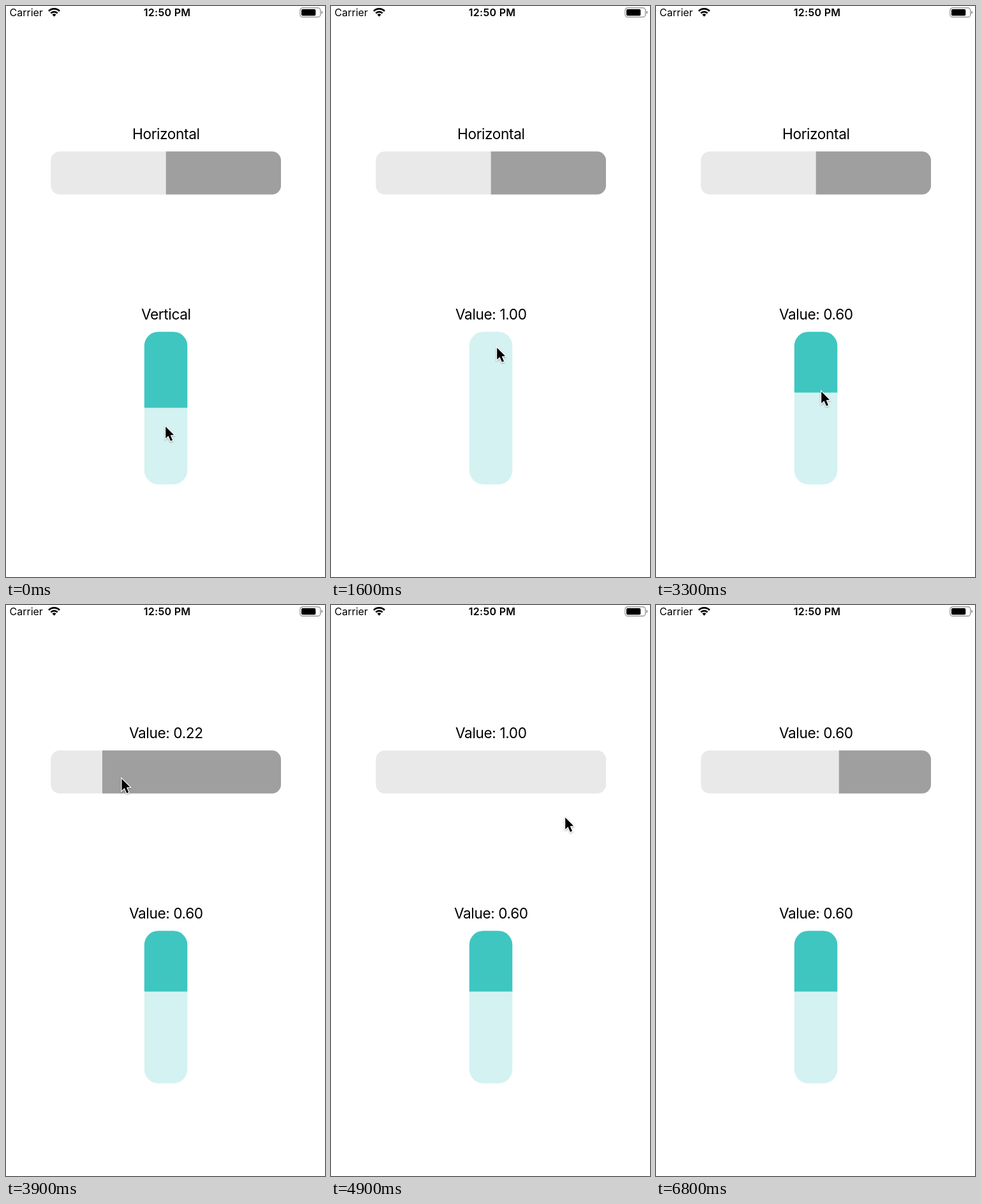
Write an HTML page that moves like this. It is 500 by 896 pixels and loops after 7500 ms.

```html
<!DOCTYPE html>
<html lang="en">
<head>
<meta charset="utf-8">
<title>Slider demo</title>
<style>
  html, body { margin: 0; width: 100%; height: 100%; overflow: hidden; background: #fff; }
  svg { display: block; width: 500px; height: 896px; font-family: Inter, sans-serif; }
  .label { font-size: 22.67px; letter-spacing: -.4px; text-anchor: middle; }
  .status { font-size: 16px; }
  .clock { font-weight: 600; letter-spacing: .3px; text-anchor: middle; }
</style>
</head>
<body>
<svg viewBox="0 0 500 896">
  <defs>
    <clipPath id="hClip"><rect x="70.3" y="228.3" width="360.7" height="67.5" rx="14"/></clipPath>
    <clipPath id="vClip"><rect x="216.8" y="511.2" width="67.5" height="239.5" rx="22"/></clipPath>
    <filter id="shadow" x="-50%" y="-50%" width="200%" height="200%">
      <feDropShadow dx="0" dy="1.2" stdDeviation="1.2" flood-opacity=".35"/>
    </filter>
  </defs>

  <text class="status" x="5.5" y="16">Carrier</text>
  <g fill="none" stroke="#000" stroke-width="2.7">
    <path d="M67 8A12 12 0 0 1 84 8M70.3 11.3A7.4 7.4 0 0 1 80.7 11.3"/>
    <path d="M75.5 16.7l-3-3.2a4.2 4.2 0 0 1 6 0z" fill="#000" stroke="none"/>
  </g>
  <text class="status clock" x="252.6" y="16">12:50 PM</text>
  <rect x="461" y="2.8" width="31.8" height="14.6" rx="4" fill="none" stroke="#8a8a8a" stroke-width="1.2"/>
  <rect x="463" y="5" width="22.3" height="10.3" rx="2"/>
  <path d="M494.3 7.6q2 .8 2 2.5t-2 2.5z" fill="#8a8a8a"/>

  <text class="label" id="hLabel" x="250.8" y="209"></text>
  <g clip-path="url(#hClip)">
    <rect id="hFill" x="70" y="228" height="69" fill="#e9e9e9"/>
    <rect id="hRest" y="228" height="69" fill="#9f9f9f"/>
  </g>

  <text class="label" id="vLabel" x="250.8" y="492"></text>
  <g clip-path="url(#vClip)">
    <rect id="vRest" x="216" y="511" width="70" fill="#3fc6c1"/>
    <rect id="vFill" x="216" width="70" fill="#d4f2f1"/>
  </g>

  <path id="cursor" d="M0 0V19L4.4 15 8 23.3 11.2 22 7.7 13.8 13.3 13.4z" stroke="#fff"
        stroke-width="2.4" paint-order="stroke" filter="url(#shadow)"/>
</svg>
<script>
const LOOP = 7500, STEP = 100, V_START = 200, H_START = 3700, EXIT = 6800;

// Turning points [ms, value]; slider values past 0 or 1 are held at the limit.
const vTurns = [[V_START, .5], [650, 1.2], [1050, .28], [1600, 1.3], [2300, -.2], [2850, 1.25], [3200, .6]];
const hTurns = [[H_START, .5], [4200, -.3], [4700, 1.2], [5700, 1.2], [6300, .6]];
const xTurns = [[V_START, 250], [1600, 260], [2500, 280], [3300, 259], [H_START, 282], [4160, 29],
  [4700, 515], [4800, 515], [4900, 367], [5200, 224], [5780, 312], [6300, 168], [6400, 168], [6700, 240]];
const yTurns = [[V_START, 659], [650, 500], [1050, 709], [1400, 485], [2180, 812], [2210, 812],
  [2815, 480], [3200, 604], [3300, 604], [H_START, 268], [4300, 283], [5100, 341], [5600, 280],
  [6100, 315], [6400, 290], [6700, 391]];

const el = id => document.getElementById(id);
const clamp = value => Math.min(1, Math.max(0, value));
const set = (id, attrs) => Object.entries(attrs).forEach(([name, value]) => el(id).setAttribute(name, value));

// Swing from one turning point to the next with cosine easing.
function swing(turns, t) {
  return turns.reduce((value, [end, target], i) => {
    if (i === 0) return target;
    const begin = turns[i - 1][0];
    const ease = (1 - Math.cos(Math.PI * clamp((t - begin) / (end - begin)))) / 2;
    return value + (target - turns[i - 1][1]) * ease;
  }, 0);
}

function draw(now) {
  const t = Math.floor(now % LOOP / STEP) * STEP;
  const h = clamp(swing(hTurns, t)), v = clamp(swing(vTurns, t));
  const hEdge = 70.3 + 360.7 * h, vEdge = 750.5 - 239.5 * v;

  el('hLabel').textContent = t > H_START ? `Value: ${h.toFixed(2)}` : 'Horizontal';
  el('vLabel').textContent = t > V_START ? `Value: ${v.toFixed(2)}` : 'Vertical';
  set('hFill', { width: hEdge - 70 });
  set('hRest', { x: hEdge, width: 431 - hEdge });
  set('vRest', { height: vEdge - 511 });
  set('vFill', { y: vEdge, height: 751 - vEdge });

  const x = swing(xTurns, t) + .2, y = swing(yTurns, t) + 1;
  set('cursor', {
    transform: `translate(${x} ${y}) scale(.97)`,
    visibility: t < EXIT ? 'visible' : 'hidden'
  });
}

const start = performance.now();
function tick() {
  draw(performance.now() - start);
  requestAnimationFrame(tick);
}
tick();
</script>
</body>
</html>
```
